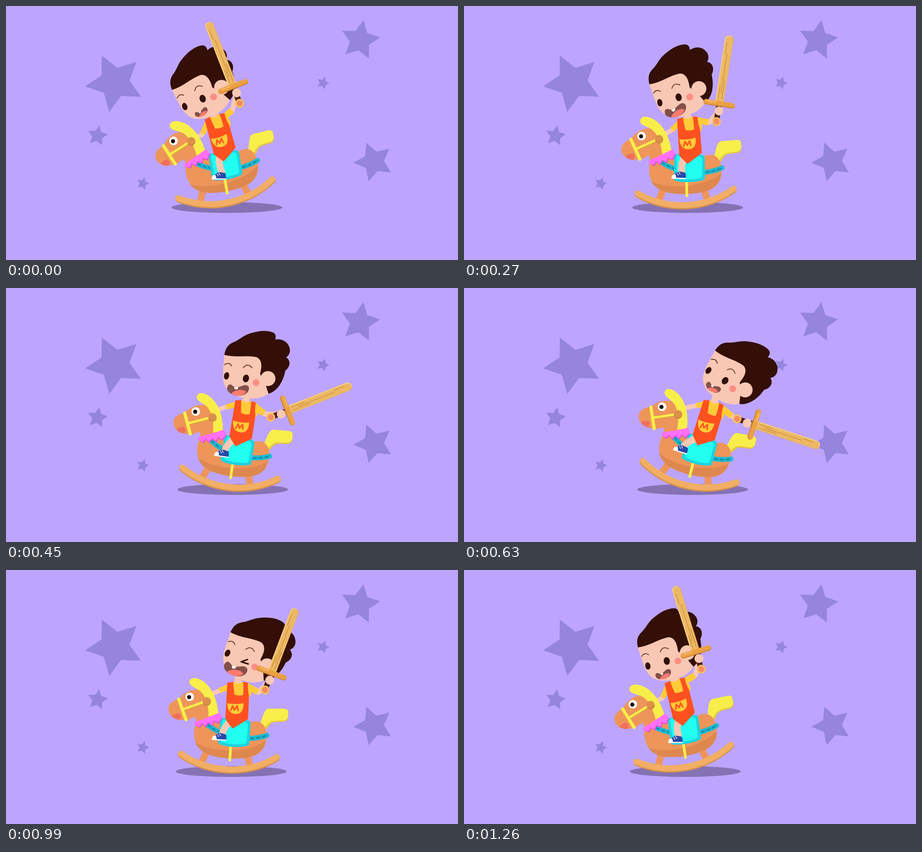
Animation, 998 px wide and 561 px high, one loop 1350 ms. Source, as an HTML page:

```html
<!DOCTYPE html>
<html lang="en">
<head>
<meta charset="utf-8">
<title>Rocking horse</title>
<style>
html, body { margin: 0; width: 100%; height: 100%; overflow: hidden; background: #bda5ff; }
svg { display: block; width: 998px; height: 561px; }
.ln { fill: none; stroke-linecap: round; stroke-linejoin: round; }
.skin { fill: #f8c8b4; }
.hair { fill: #330f08; }
.brown { fill: #ee955a; }
.yel { fill: #f8ee4a; }
.red { fill: #ff5120; }
.shirt { fill: #ffcb38; }
</style>
</head>
<body>
<svg viewBox="0 0 998 561" xmlns="http://www.w3.org/2000/svg">
  <rect width="998" height="561" fill="#bda5ff"/>
  <path id="stars" fill="#9585dc"/>
  <ellipse id="shadow" cy="445" rx="122.5" ry="12" fill="#8472b4"/>

  <path id="reinArm" class="ln" stroke="#f8c8b4" stroke-width="10"/>
  <path id="reinSleeve" class="ln" stroke="#ffcb38" stroke-width="12" style="stroke-linecap:butt"/>

  <g id="horse">
    <path fill="#e5c83c" d="M558 348C566 330 570 308 580 308L612 309C622 310 624 315 622 320C624 330 618 336 608 335L592 336C583 337 580 345 574 352Z"/>
    <path class="yel" d="M558 346C566 330 568 306 580 306L614 306C624 307 624 314 622 317C625 325 619 333 608 332L592 333C582 334 578 340 571 348Z"/>
    <path class="ln" style="stroke-linecap:butt" stroke="#ee955a" stroke-width="15" d="M443 402L432 424M533 411L539 435"/>
    <path class="ln" stroke="#d9924a" stroke-width="13" d="M386 409A198 198 0 0 0 598 416"/>
    <path class="ln" stroke="#f2ae64" stroke-width="13" d="M386 406A198 198 0 0 0 598 413"/>
    <path class="brown" d="M420 318L466 312C470 330 478 343 500 345C525 346 535 334 552 334C567 335 575 347 575 366C575 392 562 408 538 413C508 419 474 417 448 408C421 398 412 374 416 350Q418 340 422 338Z"/>
    <path fill="#de8850" d="M418 381C450 403 530 406 573 377C570 396 558 409 538 413C508 419 474 417 448 408C432 402 422 392 418 381Z"/>
    <path class="ln" stroke="#f8ee4a" stroke-width="6" d="M496 386L494 420"/>
    <g class="ln" stroke="#1fb9d2" stroke-width="11">
      <path d="M440 338Q455 352 476 360M536 372Q560 371 576 365"/>
      <path stroke="#10809a" stroke-width="2.5" stroke-dasharray="7 6" d="M445 342Q458 353 474 359M540 372Q560 371 576 365"/>
    </g>
    <path fill="#1fd2e0" d="M480 327L533 332Q540 333 540 341L537 382Q537 388 530 389Q500 394 474 386Q467 384 469 377L473 333Q474 327 480 327Z"/>
    <path fill="#20fff0" d="M483 330L528 336Q534 337 534 343L531 378Q531 383 526 384Q500 387 479 381Q474 380 475 375L478 335Q479 330 483 330Z"/>

    <path class="brown" d="M362 296C368 289 379 287 386 280C397 268 418 260 434 267L456 300L450 330L420 338L418 325C410 326 404 333 393 331C381 333 369 329 363 321C357 314 356 304 362 296Z"/>
    <path fill="#f0705c" d="M365 322C371 321 374 316 382 317C388 320 386 328 383 331C376 331 369 328 365 322Z"/>
    <path class="yel" d="M405 251C402 243 410 237 419 239C442 244 458 268 464 292Q468 306 468 319L447 324C447 300 441 281 431 270C423 262 409 259 405 251Z"/>
    <path class="ln" stroke="#dca63d" stroke-width="5" d="M391 310L438 293"/>
    <path class="ln" stroke="#f8ee4a" stroke-width="5" d="M390 308L438 291"/>
    <path class="ln" stroke="#f8ee4a" stroke-width="7" d="M381 286L397 331"/>
    <circle cx="405" cy="280.5" r="9.5" fill="#fff"/>
    <circle cx="403.8" cy="281" r="4.6" fill="#1d0d0a"/>
    <circle cx="443" cy="291" r="9" fill="#c97e40"/>
    <circle cx="443" cy="289.5" r="8.5" fill="#dd8f4c"/>
    <path fill="#d94fd6" d="M415 341L428 349L433 341L441 348L447 339L456 345L460 335L469 340L477 328L471 318Z"/>
    <path fill="#ff70f8" d="M416 336Q443 327 471 315L476 326L468 337L459 332L455 342L446 336L440 345L432 338L427 346L416 342Z"/>
  </g>

  <path id="swordArm" class="ln" stroke="#f8c8b4" stroke-width="11"/>
  <path id="swordSleeve" class="ln" stroke="#ffcb38" stroke-width="14" style="stroke-linecap:butt"/>
  <path id="leg" class="ln" stroke="#f8c8b4" stroke-width="15"/>
  <g id="foot">
    <path fill="#2a49a6" d="M-12 1Q-5 -8 3 -8L14 -6Q17 1 15 7L-14 7Z"/>
    <path fill="#fff" d="M-16 7Q-16 -2 -8 -2Q-5 3 -6 7Z"/>
    <path class="ln" stroke="#fff" stroke-width="2.4" d="M-15 7L15 7"/>
    <path class="ln" stroke="#fff" stroke-width="1.3" d="M-4 -4L-1 0M0 -6L3 -2"/>
  </g>

  <g id="torsoBase"><g id="torso">
    <path class="shirt" d="M488 250Q512 243 537 250L541 273L535 285H488Z"/>
    <path class="skin" d="M504 230H519V248Q512 254 504 248Z"/>
    <path class="red" d="M488 249L501 247Q502 262 504 275Q513 279 523 276Q524 262 523 247L534 249Q532 262 536 277L534 329Q522 337 500 350L488 335L484 329Z"/>
    <path class="shirt" d="M488 294Q506 298 524 294Q525 318 507 318Q489 318 488 294Z"/>
    <path class="ln" stroke="#ff5a20" stroke-width="3.4" d="M496 310L500 300L504 309L510 300L512 310"/>
  </g></g>

  <g id="head">
    <path class="hair" d="M443 160C442 144 446 135 458 127C470 118 474 109 488 101C506 90 524 85 538 88Q546 91 545 102C557 96 572 100 578 110C585 119 583 129 577 135C588 138 592 152 582 164C583 190 574 213 557 222L530 200Z"/>
    <path class="skin" d="M443 160C470 161 490 149 514 149C526 152 530 164 529 183L547 205L557 222C544 236 526 243 502 243C480 243 462 236 454 217C448 202 446 180 443 160Z"/>
    <circle class="skin" cx="548.5" cy="189.5" r="16.5"/>
    <path class="ln" stroke="#4a2216" stroke-width="1.6" d="M448 181Q456 172 464 180M490 178Q497 165 509 174"/>
    <ellipse class="hair" cx="458" cy="204" rx="5.7" ry="8.2"/>
    <ellipse id="eye" class="hair" cx="501" cy="200" rx="6.8" ry="8.6"/>
    <path id="wink" class="ln" stroke="#330f08" stroke-width="3.2" d="M503.6 196.5L493.4 207.3L509.9 204.5"/>
    <circle cx="525" cy="204" r="7.5" fill="#ff8d86"/>
    <g id="mouth">
      <path fill="#845049" d="M463 229C463 220 469 218 475 222C482 225 490 222 497 217C505 211 515 212 515 222C515 235 500 242 488 243C474 243 463 238 463 229Z"/>
      <path fill="#ff7b70" d="M476 241C480 231 500 222 510 229C506 238 497 242 488 243Q481 243 476 241Z"/>
      <path fill="#fff" d="M479 223.5Q484 224 488 221L489 225Q487 229 483 229Q480 228 479 223.5Z"/>
    </g>
  </g>

  <g id="sword">
    <path fill="#4a2015" d="M-6 -42H6V-4H-6Z"/>
    <path fill="#cf9145" d="M-9.5 -42V-183Q-9 -192 0 -192Q9 -192 9 -183V-42Z"/>
    <path fill="#f7d08a" d="M-9.5 -42V-183Q-9 -192 0 -192Q8 -192 8 -183V-42Z"/>
    <path fill="#edb863" d="M-7.5 -42V-182Q-7 -190 0 -190.5Q9 -191 9 -183V-42Z"/>
    <path class="ln" stroke="#c98c3c" stroke-width="1.3" d="M-4 -176V-152M0 -150V-64M4 -92V-50M-4 -80V-50"/>
    <path class="ln" stroke="#cf8430" stroke-width="11" d="M-29.5 -39.5H29.5"/>
    <path class="ln" stroke="#eba043" stroke-width="10" d="M-29.5 -41H29.5"/>
    <path class="ln" stroke="#f8bd6c" stroke-width="2.4" d="M-27 -42.5H-8"/>
    <circle r="9.8" fill="#f6c15c"/>
    <circle r="6.5" fill="#f58a68"/>
    <circle class="skin" cx="2" cy="-24" r="9.8"/>
  </g>
</svg>
<script>
const el = id => document.getElementById(id);
const set = (id, name, v) => el(id).setAttribute(name, v);
const rad = d => d * Math.PI / 180;
const STEP = 90, COUNT = 15;

// Key poses by step, periodic over COUNT steps.
const beats = [0, 2, 4, 7, 9, 11, 14];
const tracks = {
  neck: [[458, 241, -18.5], [475, 240, -18.5], [512, 242, 0], [560, 245, 37], [554, 245, 42], [520, 242, 27], [465.5, 240.6, -9.5]],
  sword: [[516, 215, -21.2], [543, 234, -16.3], [571, 276, 39.6], [603, 289, 108.3], [594, 288, 85.3], [572, 265, 20.7], [524, 219, -17.4]],
  elbow: [[500, 229], [527, 243], [556, 271], [593, 284], [582, 285], [558, 270], [511, 232]],
  rein: [[433, 284, 424, 289], [449, 281, 438, 289], [470, 267, 452, 275], [512, 260, 484, 266], [503, 261, 478, 270], [470, 267, 452, 275], [438, 283, 427, 288]],
  foot: [[470, 375, 0], [473.5, 376, 0], [475, 370, 4], [479, 355, 17], [476, 356, 17], [471, 368, 4], [467, 374, 0]],
  mouth: [[.58], [.82], [1], [.66], [.78], [1], [.68]]
};

// Smooth cubic through the key poses.
function pose(name, n) {
  const keys = tracks[name], len = beats.length;
  const at = i => beats[(i + len) % len] + COUNT * Math.floor(i / len);
  const val = (i, c) => keys[(i + len) % len][c];
  let i = len - 1;
  while (beats[i] > n) i--;
  const h = at(i + 1) - at(i), u = (n - at(i)) / h;
  return keys[0].map((_, c) => {
    const slope = j => (val(j + 1, c) - val(j, c)) / (at(j + 1) - at(j));
    const tangent = j => {
      const a = at(j) - at(j - 1), b = at(j + 1) - at(j);
      return (slope(j - 1) * b + slope(j) * a) / (a + b);
    };
    const w = u * u * (3 - 2 * u);
    return val(i, c) * (1 - w) + val(i + 1, c) * w
      + h * u * (1 - u) * ((1 - u) * tangent(i) - u * tangent(i + 1));
  });
}

function turn([x, y], deg, cx = 0, cy = 0) {
  const c = Math.cos(rad(deg)), s = Math.sin(rad(deg));
  return [cx + (x - cx) * c - (y - cy) * s, cy + (x - cx) * s + (y - cy) * c];
}
const mix = (a, b, k) => a.map((v, i) => v + (b[i] - v) * k);
const line = (...pts) => 'M' + pts.map(p => p.map(v => v.toFixed(2)).join(' ')).join('L');

function star(cx, cy, r, deg) {
  const pts = [];
  for (let i = 0; i < 10; i++) {
    const [x, y] = turn([i % 2 ? r / 2 : r, 0], deg + i * 36);
    pts.push([cx + x, cy + y]);
  }
  return line(...pts) + 'Z';
}
set('stars', 'd', [
  [240, 169, 66, -115.5], [781.5, 75.5, 45, -80], [700, 170, 14.5, -70],
  [202, 286.5, 23.3, -80], [302, 392, 14.5, -73], [812, 343.5, 45, -111.5]
].map(s => star(...s)).join(''));

function draw(n) {
  const s = 1 - Math.abs(n / COUNT * 2 - 1);
  const tilt = -13.3 + 24.5 * s * s * (3 - 2 * s);
  const lean = tilt * .35;
  const dx = 193 * rad(tilt), dy = -1.7 * (tilt / 13) ** 2;
  const torsoPt = (x, y) => {
    const p = turn(turn([x, y], lean, 505, 315), tilt, 492, 249);
    return [p[0] + dx, p[1] + dy];
  };

  const rock = `translate(${dx} ${dy}) rotate(${tilt} 492 249)`;
  set('horse', 'transform', rock);
  set('torsoBase', 'transform', rock);
  set('torso', 'transform', `rotate(${lean} 505 315)`);
  set('shadow', 'cx', 497 + tilt * .7);

  const [rx, ry, hx, hy] = pose('rein', n);
  const back = torsoPt(493, 257);
  set('reinArm', 'd', line(back, [rx, ry], [hx, hy]));
  set('reinSleeve', 'd', line(back, mix(back, [rx, ry], .95)));

  const [sx, sy, sa] = pose('sword', n);
  set('sword', 'transform', `translate(${sx} ${sy}) rotate(${sa})`);
  const grip = turn([2, -24], sa);
  const elbow = pose('elbow', n), front = torsoPt(532, 257);
  set('swordArm', 'd', line(front, elbow, [sx + grip[0], sy + grip[1]]));
  set('swordSleeve', 'd', line(front, mix(front, elbow, .92)));

  const [fx, fy, fa] = pose('foot', n);
  set('foot', 'transform', `translate(${fx} ${fy}) rotate(${fa})`);
  const hip = torsoPt(496, 334), ankle = [fx + 7, fy - 7];
  const knee = mix(hip, ankle, .45);
  set('leg', 'd', `M${hip}Q${knee[0] - 7} ${knee[1]} ${ankle}`);

  const [nx, ny, na] = pose('neck', n);
  set('head', 'transform', `translate(${nx} ${ny}) rotate(${na}) translate(-512 -242)`);
  const [m] = pose('mouth', n);
  set('mouth', 'transform', `translate(488 228) scale(${m}) translate(-488 -228)`);
  const winking = n >= 8 && n <= 12;
  set('eye', 'visibility', winking ? 'hidden' : 'visible');
  set('wink', 'visibility', winking ? 'visible' : 'hidden');
}

let start = null, last = -1;
function tick(now) {
  if (start === null) start = now;
  const n = Math.floor((now - start) / STEP) % COUNT;
  if (n !== last) draw(last = n);
  requestAnimationFrame(tick);
}
draw(0);
requestAnimationFrame(tick);
</script>
</body>
</html>
```
